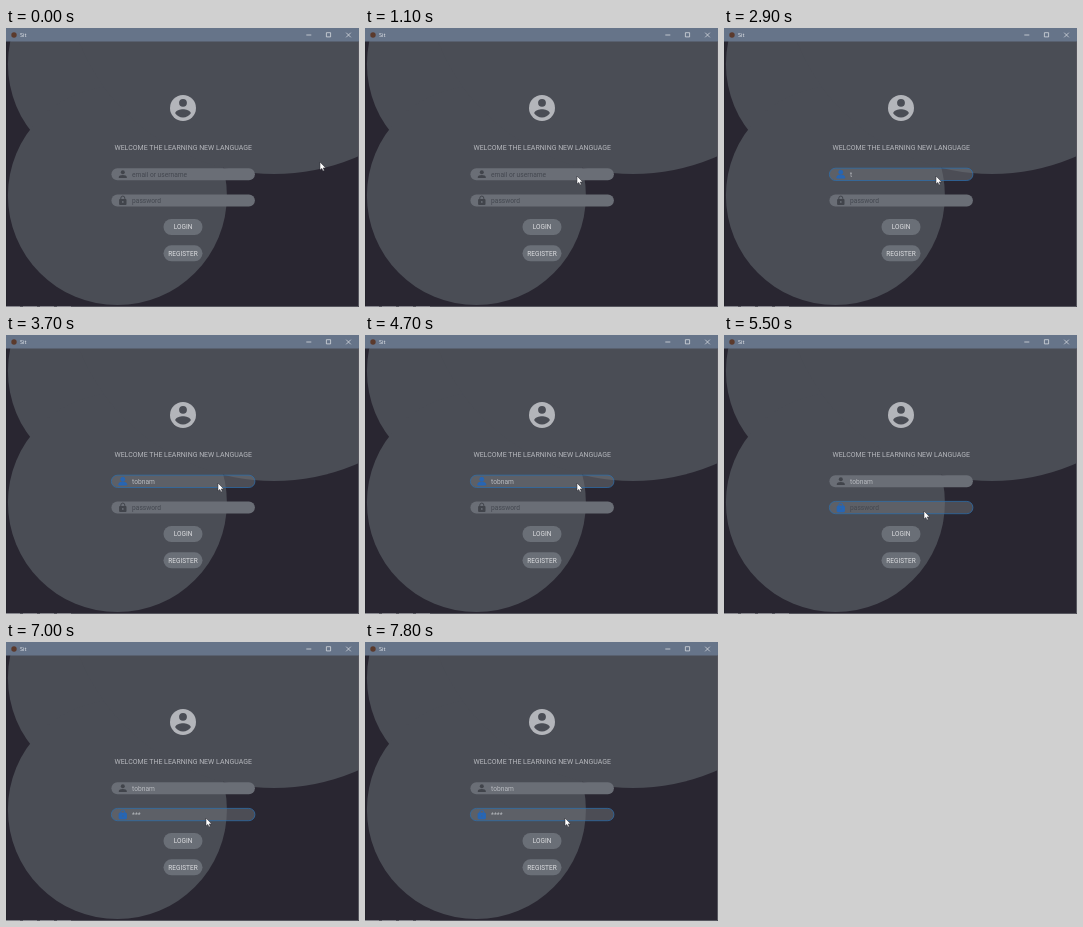
Animation of 353 by 279 pixels, one loop 8000 ms. Source, as an HTML page:

```html
<!DOCTYPE html>
<html lang="en">
<head>
<meta charset="utf-8">
<title>Login form</title>
<style>
  html, body { margin: 0; width: 100%; height: 100%; overflow: hidden; background: #292631; }
  svg { display: block; width: 353px; height: 279px; }
  text { font-family: Roboto, sans-serif; font-size: 6.65px; }
  .title { font: 5.6px "Open Sans", sans-serif; fill: #eceef2; }
  .heading { font-size: 7px; fill: #b6b8bd; text-anchor: middle; }
  .button rect { fill: #6a6f77; }
  .button text { font-size: 6.5px; fill: #dcdde0; text-anchor: middle; }
  .shade { fill: #4a4d55; }
  .idle { fill: #6a6e76; }
  .active { fill: #70747a; opacity: .5; }
  .ring { fill: none; stroke: #2f6fab; stroke-width: .9; }
  .icon { fill: currentColor; color: #41444b; }
  .icon.on { color: #2766b4; stroke: currentColor; stroke-width: .9; }
  .hint { fill: #444850; }
  .value { fill: #b6b9be; }
</style>
</head>
<body>
<svg viewBox="0 0 353 279">
  <rect width="353" height="279" fill="#292631"/>
  <g class="shade">
    <circle cx="111.4" cy="36" r="109.5"/>
    <circle cx="111.4" cy="167.6" r="109.5"/>
    <circle cx="268" cy="-64" r="210"/>
  </g>
  <path d="M.5 14V279" stroke="#24242c"/>
  <path d="M352.5 14V278.5H0" fill="none" stroke="#56565e"/>
  <path d="M0 278.5H66" stroke="#85858c" stroke-dasharray="14 3"/>

  <rect width="353" height="13.5" fill="#667489"/>
  <circle cx="8" cy="7" r="2.7" fill="#5b3a2c"/>
  <text class="title" x="14" y="9.2">Sit</text>
  <path d="M300.3 7h5M320.4 4.7h4.2v4.2h-4.2zM340.2 4.7l4.6 4.6M344.8 4.7l-4.6 4.6" fill="none" stroke="#e2e5ea" stroke-width=".7"/>

  <g transform="translate(177 80)">
    <circle r="13" fill="#b3b5ba"/>
    <circle class="shade" cy="-5.2" r="3.9"/>
    <path class="shade" d="M0 9.4C-3.3 9.4-6.1 7.7-7.8 5.2C-7.7 2.6-2.6 1.2 0 1.2S7.7 2.6 7.8 5.2C6.1 7.7 3.3 9.4 0 9.4z"/>
  </g>
  <text class="heading" x="177.2" y="122.4">WELCOME THE LEARNING NEW LANGUAGE</text>

  <g id="user" transform="translate(105.4 140.2)">
    <rect class="idle" width="143.5" height="12" rx="6"/>
    <rect class="active" width="143.5" height="12" rx="6"/>
    <rect class="ring" width="143.5" height="12.3" rx="6"/>
    <g class="icon">
      <circle cx="11.4" cy="4" r="2"/>
      <path d="M11.4 6.9c-2.2 0-4 .9-4 2v1h8v-1c0-1.1-1.8-2-4-2z"/>
    </g>
    <text class="hint" x="20.7" y="8.4">email or username</text>
    <text class="value" x="20.7" y="8.4"></text>
  </g>

  <g id="pass" transform="translate(105.4 166.4)">
    <rect class="idle" width="143.5" height="12" rx="6"/>
    <rect class="active" width="143.5" height="12" rx="6"/>
    <rect class="ring" width="143.5" height="12.3" rx="6"/>
    <g class="icon">
      <path d="M9.4 5V3.7a2 2 0 0 1 4 0V5" fill="none" stroke="currentColor"/>
      <path fill-rule="evenodd" d="M8.6 4.6h5.6q.9 0 .9.9v4.1q0 .9-.9.9H8.6q-.9 0-.9-.9V5.5q0-.9.9-.9zM10.5 7.5a.9.9 0 1 0 1.8 0a.9.9 0 1 0-1.8 0z"/>
    </g>
    <text class="hint" x="20.7" y="8.4">password</text>
    <text class="value" x="20.7" y="8.9"></text>
  </g>

  <g class="button">
    <rect x="157.5" y="191" width="39" height="16" rx="8"/>
    <text x="177" y="201.2">LOGIN</text>
    <rect x="157.5" y="217.3" width="39" height="16" rx="8"/>
    <text x="177" y="227.5">REGISTER</text>
  </g>

  <path id="pointer" d="M0 0V8L1.8 6.4L3 9L4.3 8.4L3.2 5.9H5.7z" fill="#fff" stroke="#25252c" stroke-width=".5"/>
</svg>
<script>
const LOOP = 8000, TICK = 100;

// [time, x, y]
const path = [
  [300, 314, 134], [500, 291, 145], [700, 252, 157], [900, 224, 156], [1100, 212, 148],
  [4800, 212, 148], [5000, 209, 161], [5100, 209, 161], [5300, 200, 176]
];

const fields = [
  { id: "user", focus: [1700, 5400], text: "tobnam", keys: [2900, 3100, 3300, 3400, 3500, 3700] },
  { id: "pass", focus: [5400, LOOP], text: "****", keys: [6000, 6600, 6900, 7300] }
].map(f => {
  const root = document.getElementById(f.id);
  const part = name => root.querySelector("." + name);
  return { ...f, idle: part("idle"), active: part("active"), ring: part("ring"),
           icon: part("icon"), hint: part("hint"), value: part("value") };
});
const pointer = document.getElementById("pointer");

function pointerAt(t) {
  const i = path.findIndex(p => p[0] > t);
  if (i === 0) return path[0].slice(1);
  if (i < 0) return path[path.length - 1].slice(1);
  const a = path[i - 1], b = path[i];
  const k = (t - a[0]) / (b[0] - a[0]);
  return [a[1] + (b[1] - a[1]) * k, a[2] + (b[2] - a[2]) * k];
}

function drawField(f, t) {
  const [from, to] = f.focus;
  const on = t >= from && t < to;
  const level = on ? Math.min(1, (t - from + TICK) / 200) : 0;
  const typed = f.keys.filter(k => k <= t).length;
  f.idle.style.opacity = 1 - level;
  f.active.style.opacity = level * .5;
  f.ring.style.opacity = level * .85;
  f.icon.classList.toggle("on", on);
  f.value.textContent = f.text.slice(0, typed);
  f.hint.style.display = typed ? "none" : "";
}

function draw(now) {
  const t = Math.floor(now % LOOP / TICK) * TICK;
  pointer.setAttribute("transform", `translate(${pointerAt(t).map(Math.round)})`);
  fields.forEach(f => drawField(f, t));
}

const start = performance.now();
function frame() {
  draw(performance.now() - start);
  requestAnimationFrame(frame);
}
frame();
</script>
</body>
</html>
```
